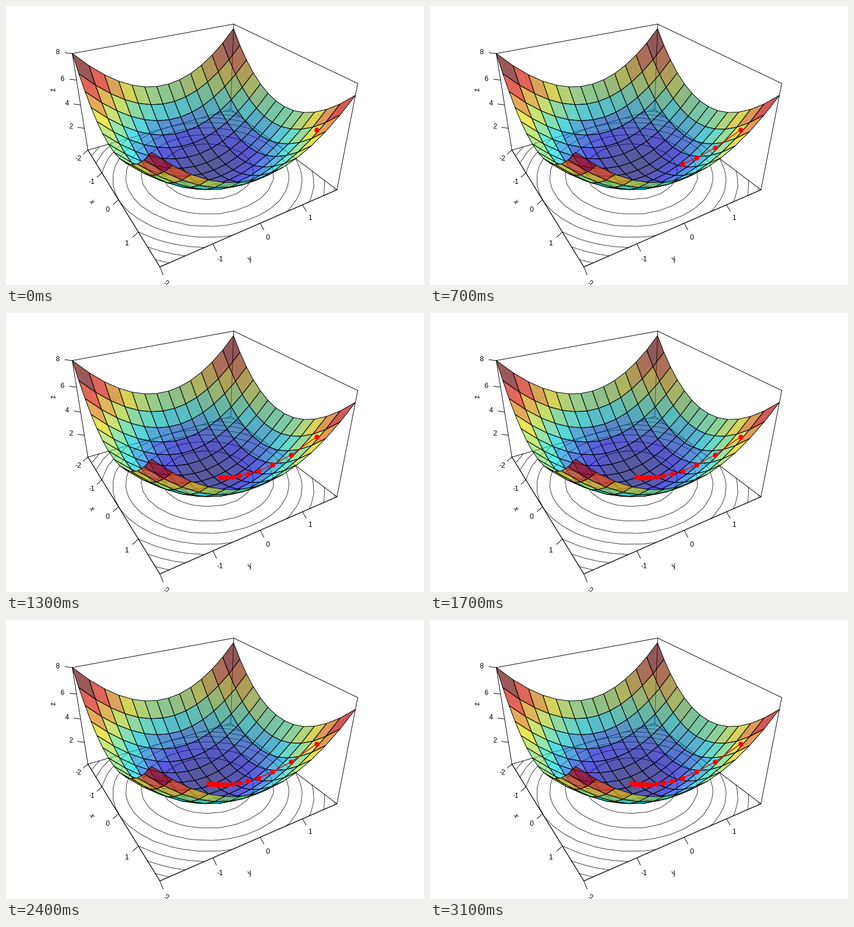
Recreate the animation shown at these times as a matplotlib script. Size 720 px wide and 480 px high, loop 4100 ms.

```python
import numpy as np
import matplotlib.pyplot as plt
from matplotlib.animation import FuncAnimation
from matplotlib.collections import LineCollection, PolyCollection
from matplotlib.colors import LinearSegmentedColormap

W, H, DPI = 720, 480, 80
PX = 72 / DPI                       # points per pixel
THETA, PHI = np.radians(60), np.radians(30)
EXPAND, DIST = 0.6, 4.449
ALPHA, SHADE = 0.65, 0.3
STEPS, RATE, START = 27, 0.1, 1.5

grid = -2 + 0.3 * np.arange(14)
X, Y = np.meshgrid(grid, grid, indexing="ij")
Z = X**2 + Y**2
LO, HI, ZLO, ZHI = grid[0], grid[-1], Z.min(), Z.max()


def unit(v, lo, hi):
    return (2 * np.asarray(v, float) - lo - hi) / (hi - lo)


def view(u, v, w):
    """Perspective view of cube coordinates: x, y (up) and depth."""
    w = EXPAND * np.asarray(w)
    side = u * np.cos(THETA) + v * np.sin(THETA)
    near = u * np.sin(THETA) - v * np.cos(THETA)
    depth = DIST - w * np.sin(PHI) - near * np.cos(PHI)
    up = w * np.cos(PHI) - near * np.sin(PHI)
    return side / depth, up / depth, depth


# Fit the cube's outline to the stage, centred with a small margin
cube = np.array(np.meshgrid([-1, 1], [-1, 1], [-1, 1])).reshape(3, -1)
bx, by, _ = view(*cube)
K = 417.8 / np.ptp(by)
CX = W / 2 - K * (bx.min() + bx.max()) / 2
CY = H / 2 + K * (by.min() + by.max()) / 2


def to_px(u, v, w):
    x, y, _ = view(u, v, w)
    return np.stack([CX + K * x, CY - K * y], axis=-1)


def data_px(x, y, z):
    return to_px(unit(x, LO, HI), unit(y, LO, HI), unit(z, ZLO, ZHI))


fig = plt.figure(figsize=(W / DPI, H / DPI), dpi=DPI, facecolor="white")
ax = fig.add_axes([0, 0, 1, 1])


def add_lines(segs, width, z):
    ax.add_collection(LineCollection(segs, colors="black", linewidths=width * PX,
                                     zorder=z, capstyle="round"))


# Level curves on the floor
cs = ax.contour(X, Y, Z, levels=range(1, 8))
rings = [data_px(s[:, 0], s[:, 1], ZLO)
         for level in cs.allsegs for s in level if len(s) > 1]
cs.remove()
add_lines(rings, 0.75, 1)

# Box
A, B, C, D = (-1, -1), (1, -1), (1, 1), (-1, 1)


def edge(p, q, wp, wq):
    return np.array([to_px(*p, wp), to_px(*q, wq)])


floor = [edge(p, q, -1, -1) for p, q in ((A, B), (B, C), (C, D), (D, A))]
walls = [edge(p, p, -1, 1) for p in (A, C, D)]
top = [edge(A, D, 1, 1), edge(D, C, 1, 1)]
add_lines(floor + walls + top, 0.95, 2)
add_lines(floor[:2], 0.95, 2)


# Ticks and labels
def put(text, x, y, **kw):
    ax.text(x, y, text, family="Liberation Sans", fontsize=12 * PX,
            ha="center", zorder=3, **kw)


def tick(value, base, out):
    base, out = np.array(base, float), np.array(out, float)
    add_lines([np.array([to_px(*base), to_px(*(base + 0.06 * out))])], 0.95, 2)
    x, y = to_px(*(base + 0.12 * out))
    put(str(value), x, y + 4.3, va="baseline")


for n in (-2, -1, 0, 1):
    pos = unit(n, LO, HI)
    tick(n, (pos, -1, -1), (0, -1, -1))
    tick(n, (1, pos, -1), (1, 0, -1))
for n in (2, 4, 6, 8):
    tick(n, (-1, -1, unit(n, ZLO, ZHI)), (-1, -1, 0))

put("x", 147, 337, va="center", rotation=-58.5)
put("y", 420, 435.5, va="center", rotation=23.6)
put("z", 82, 144, va="center", rotation=99)

# Surface facets, lit from the far corner and painted back to front
U, V, S = unit(X, LO, HI), unit(Y, LO, HI), unit(Z, ZLO, ZHI)
points = to_px(U, V, S)
depth = view(U, V, S)[2]


def corners(a):
    return np.stack([a[:-1, :-1], a[1:, :-1], a[1:, 1:], a[:-1, 1:]], axis=2)


pos = corners(np.stack([U, V, EXPAND * S], axis=-1))
normal = np.cross(pos[:, :, 1] - pos[:, :, 3], pos[:, :, 2] - pos[:, :, 0])
normal /= np.linalg.norm(normal, axis=-1, keepdims=True)
light = np.array([-1, 1, 0]) / np.sqrt(2)
shade = ((normal @ light + 1) / 2) ** SHADE

jet = LinearSegmentedColormap.from_list("ramp", [
    "#00007F", "#0000FF", "#007FFF", "#00FFFF", "#7FFF7F",
    "#FFFF00", "#FF7F00", "#FF0000", "#7F0000"])
height = corners(Z).mean(axis=2)
colors = jet((height - height.min()) / np.ptp(height))
colors[..., :3] *= shade[..., None]
colors[..., 3] = ALPHA

order = np.argsort(-corners(depth).mean(axis=2).ravel())
ax.add_collection(PolyCollection(
    corners(points).reshape(-1, 4, 2)[order],
    facecolors=colors.reshape(-1, 4)[order],
    edgecolors="black", linewidths=1.0 * PX, joinstyle="round", zorder=4))

# Gradient descent on x^2 + y^2
path = START * (1 - 2 * RATE) ** np.arange(STEPS + 1)
track = data_px(path, path, 2 * path**2)
trail, = ax.plot([], [], "-o", color="red", lw=1.4 * PX, ms=8.6 * PX,
                 mew=0, zorder=5)

ax.set_xlim(0, W)
ax.set_ylim(H, 0)
ax.axis("off")


def update(i):
    n = 1 + min(max(i - 4, 0), STEPS)
    trail.set_data(track[:n, 0], track[:n, 1])
    return trail,


anim = FuncAnimation(fig, update, frames=41, interval=100,
                     init_func=lambda: update(0), repeat=True, repeat_delay=0)
plt.show()
```
